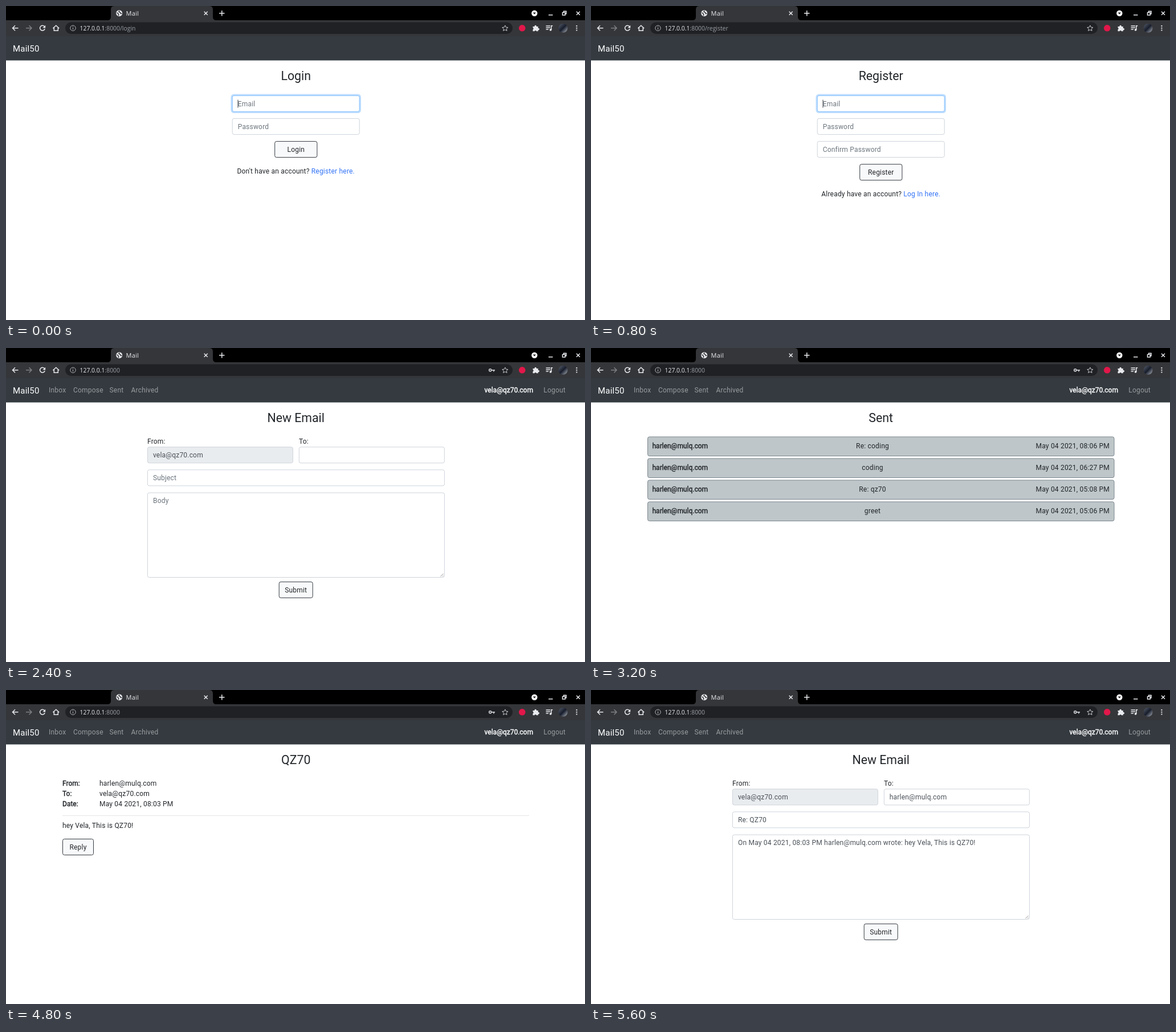
Recreate the animation shown at these times as an HTML page. Size 1016 by 551 pixels, loop 6.4 s.

```html
<!DOCTYPE html>
<html lang="en">
<head>
<meta charset="utf-8">
<title>Mail</title>
<style>
  html, body { margin: 0; width: 100%; height: 100%; overflow: hidden; background: #fff; }
  svg { display: block; width: 1016px; height: 551px; }
  text { font: 12px Roboto, sans-serif; letter-spacing: .2px; fill: #212529; white-space: pre; }
  .mid { text-anchor: middle; }
  .end { text-anchor: end; }
  text.head { font-size: 21.3px; letter-spacing: 0; }
  text.brand { font-size: 15px; fill: #fff; }
  text.nav { fill: #999c9f; }
  text.strong { letter-spacing: 0; stroke: #212529; stroke-width: .4px; }
  text.user { fill: #fff; stroke: #fff; }
  text.small { font-size: 10.4px; fill: #343a40; }
  text.hint { fill: #6c757d; }
  text.value { fill: #495057; }
  .link { fill: #3273f6; }
  text.tab { font: 11px "Open Sans", sans-serif; fill: #e8eaed; }
  text.url { font: 10.4px "Open Sans", sans-serif; letter-spacing: 0; fill: #9aa0a6; }
  .host { fill: #e8eaed; }
  .line { fill: none; stroke: #e8eaed; stroke-width: 1.5; }
  .solid { fill: #e8eaed; }
  .field { fill: #fff; stroke: #ced4da; }
  .field.locked { fill: #e9ecef; }
  .field.focus { stroke: #80bdff; }
  .row { fill: #bec6c9; stroke: #7b858c; }
  .button { fill: #f8f9fa; stroke: #343a40; }
  .button.clear { fill: none; }
  .screen { visibility: hidden; animation: show 6.4s step-end infinite; }
  .session { visibility: hidden; animation: session 6.4s step-end infinite; }
  @keyframes show { 0% { visibility: visible; } 12.5%, 100% { visibility: hidden; } }
  @keyframes session { 0% { visibility: hidden; } 25%, 100% { visibility: visible; } }
</style>
</head>
<body>
<svg viewBox="0 0 1016 551">
  <defs>
    <linearGradient id="photo" x2="1" y2="1">
      <stop offset="0" stop-color="#59616f"/>
      <stop offset=".5" stop-color="#181d2c"/>
      <stop offset="1" stop-color="#aeb4bd"/>
    </linearGradient>
  </defs>
  <rect width="1016" height="551" fill="#fff"/>
  <rect width="1016" height="26" fill="#000"/>
  <rect y="25" width="1016" height="28" fill="#353639"/>
  <path d="M178 25Q184 25 184 19V6Q184 0 190 0H357Q363 0 363 6V19Q363 25 369 25Z" fill="#353639"/>
  <rect x="104" y="28.5" width="785" height="20.5" rx="10.2" fill="#202125"/>
  <rect y="53" width="1016" height="42.5" fill="#343a40"/>

  <!-- tab strip -->
  <circle class="solid" cx="198.7" cy="12.7" r="5.5"/>
  <path d="M194.5 11.5l3 2.7v3M199 8.2l-1 2 2.5 1.2 1 2.2 2-.7" fill="none" stroke="#353639" stroke-width="1.5"/>
  <text class="tab" x="210.5" y="16.7">Mail</text>
  <path class="line" d="M347.7 9.8l6 6m0-6l-6 6M374 12.7h9.5M378.8 8v9.5"/>
  <circle cx="927.3" cy="12.7" r="5.2" fill="#fff"/>
  <path d="M924.8 11.5h5l-2.5 3z" fill="#000"/>
  <path class="line" d="M952 15.8h7.5M976.5 11.5h4.7v4.5h-4.7zM978.5 11V9.2h4.5v4.5h-1.5M1001 9.8l6 6m0-6l-6 6"/>

  <!-- toolbar -->
  <path class="line" d="M21.5 38.8H11.8M16 34.3l-4.5 4.5 4.5 4.5"/>
  <path class="line" d="M35 38.8h9.7M40.5 34.3l4.5 4.5-4.5 4.5" style="stroke:#7d7f82"/>
  <path class="line" d="M67.3 35.7a4.4 4.4 0 1 0 .9 4.3"/>
  <path class="solid" d="M69.2 33.7v4.8h-4.8z"/>
  <path class="line" d="M82.3 39.2l5.5-5 5.5 5M84.3 38v5.2h7V38"/>
  <g class="line" style="stroke:#b4b7bb;stroke-width:1">
    <circle cx="117.5" cy="38.8" r="4.7"/>
    <path d="M117.5 38v3.5M117.5 35.8v1.2"/>
  </g>
  <path d="M875.8 33.9l1.5 3.3 3.6.4-2.7 2.4.8 3.5-3.2-1.8-3.2 1.8.8-3.5-2.7-2.4 3.6-.4z" fill="none" stroke="#c4c7cb"/>
  <circle cx="905.7" cy="38.8" r="5.8" fill="#e2174a"/>
  <path class="solid" d="M924.5 36h3a1.7 1.7 0 1 1 3.2 0h3v3a1.7 1.7 0 1 1 0 3.2v2h-3a1.7 1.7 0 0 0-3.2 0h-3v-3a1.7 1.7 0 0 0 0-3.2z"/>
  <path class="line" d="M947.5 35h7.5M947.5 38h7.5M947.5 41h4.5M956.8 42v-7.3h2.5"/>
  <circle class="solid" cx="955.6" cy="41.8" r="1.9"/>
  <circle cx="977.5" cy="38.8" r="8" fill="url(#photo)"/>
  <path class="solid" d="M1000.4 34h2v2h-2zm0 3.8h2v2h-2zm0 3.8h2v2h-2z"/>
  <text class="url" x="129.5" y="42.5"><tspan class="host">127.0.0.1</tspan>:8000<tspan class="screen">/login</tspan></text>
  <text class="brand" x="12" y="79.5">Mail50</text>

  <g class="session">
    <circle cx="849.7" cy="38.8" r="2" fill="none" stroke="#c4c7cb" stroke-width="1.7"/>
    <path d="M852 38.8h6M855.8 39v2.4" fill="none" stroke="#c4c7cb" stroke-width="1.7"/>
    <text class="nav" x="75" y="78">Inbox</text>
    <text class="nav" x="118" y="78">Compose</text>
    <text class="nav" x="181.5" y="78">Sent</text>
    <text class="nav" x="219.5" y="78">Archived</text>
    <text class="strong user end" x="925" y="78">vela@qz70.com</text>
    <text class="nav end" x="982" y="78">Logout</text>
  </g>
  <g id="pages"></g>
</svg>
<script>
const SLOT = 800;
const me = "vela@qz70.com";
const peer = "harlen@mulq.com";

const text = (x, y, str, cls = "") => `<text class="${cls}" x="${x}" y="${y}">${str}</text>`;
const box = (x, y, w, h, cls) => `<rect class="${cls}" x="${x}" y="${y}" width="${w}" height="${h}" rx="3"/>`;
const heading = str => text(508.7, 129.7, str, "head mid");
const button = (x, y, w, str) => box(x, y, w, 28, "button") + text(x + w / 2, y + 18.2, str, "mid");
const field = (x, y, w, str, kind = "hint", state = "") =>
  box(x, y, w, 28, "field " + state) + text(x + 9.5, y + 18.3, str, kind);

// Sign-in and sign-up forms share one column
function account(title, hints, question, link) {
  const glow = `<rect x="396" y="156" width="225.5" height="30.5" rx="4" fill="none" stroke="#bfdeff" stroke-width="3"/>`;
  const fields = hints.map((hint, i) =>
    field(397.2, 157.3 + i * 40.1, 223, hint, "hint", i ? "" : "focus")).join("");
  const y = 157.4 + hints.length * 40.1;
  const caret = `<path d="M407 164.5v14" stroke="#343a40"/>`;
  return heading(title) + glow + fields + caret + button(471.7, y, 74.2, title) +
    text(508.7, y + 56, `${question} <tspan class="link">${link}</tspan>`, "mid");
}

// Each mail: subject, subject centre, date, date centre
function mailList(title, action, width, mails) {
  return heading(title) + mails.map(([subject, sx, date, dx], i) => {
    const y = 155.9 + i * 43.2, base = y + 23.3;
    return box(99.5, y, 818.5, 38.6, "row") + text(107.5, base, peer, "strong") +
      text(sx, base, subject, "mid") + text(dx, base, "May 04 2021, " + date, "mid") +
      box(910.2 - width, y + 8.2, width, 22.6, "button clear") +
      text(910.2 - width / 2, y + 22.8, action, "small mid");
  }).join("");
}

function sentList(mails) {
  return heading("Sent") + mails.map(([subject, date], i) => {
    const y = 155.9 + i * 38, base = y + 20.5;
    return box(99.5, y, 818.5, 33.6, "row") + text(107.5, base, peer, "strong") +
      text(494, base, subject, "mid") + text(910, base, "May 04 2021, " + date, "end");
  }).join("");
}

function compose(to, subject, body, kind) {
  return heading("New Email") + text(248, 168, "From:") + text(514, 168, "To:") +
    field(248.4, 173.8, 255, me, "value", "locked") + field(514.3, 173.8, 255, to, kind) +
    field(248.4, 213.8, 521, subject, kind) +
    box(248.4, 254.1, 521, 148.4, "field") + text(258, 271.8, body, kind) +
    `<path d="M762.5 401l5-5M766 401l1.5-1.5" stroke="#777" stroke-width=".8"/>` +
    button(479.2, 410.4, 59, "Submit");
}

function message() {
  const line = (y, label, str) => text(99, y, label, "strong") + text(164, y, str);
  return heading("QZ70") + line(168, "From:", peer) + line(186, "To:", me) +
    line(204, "Date:", "May 04 2021, 08:03 PM") +
    `<path d="M99 220.5H918" stroke="#e5e5e5"/>` +
    text(99, 242, "hey Vela, This is QZ70!") + button(99.5, 261.5, 54, "Reply");
}

const register = `<text class="url" x="129.5" y="42.5"><tspan visibility="hidden">127.0.0.1:8000</tspan>/register</text>`;

const pages = [
  account("Login", ["Email", "Password"], "Don't have an account?", "Register here."),
  register + account("Register", ["Email", "Password", "Confirm Password"], "Already have an account?", "Log In here."),
  mailList("Inbox", "Archive", 50.7, [
    ["QZ70", 374, "08:03 PM", 606.5],
    ["coding", 376.5, "07:21 PM", 610],
    ["Greet", 375.5, "07:18 PM", 607.5],
    ["greet", 375.5, "07:13 PM", 607.5],
    ["Re: coding", 380, "06:31 PM", 616.5],
    ["qz70", 374, "05:07 PM", 606],
    ["Re: greet", 378, "05:07 PM", 613.5]
  ]),
  compose("", "Subject", "Body", "hint"),
  sentList([["Re: coding", "08:06 PM"], ["coding", "06:27 PM"], ["Re: qz70", "05:08 PM"], ["greet", "05:06 PM"]]),
  mailList("Archive", "Unarchive", 62.4, [
    ["Re: coding", 375.7, "06:31 PM", 608],
    ["qz70", 370, "05:07 PM", 598]
  ]),
  message(),
  compose(peer, "Re: QZ70", `On May 04 2021, 08:03 PM ${peer} wrote: hey Vela, This is QZ70!`, "value")
];

document.getElementById("pages").innerHTML = pages.map((page, i) =>
  `<g class="screen" style="animation-delay:${i * SLOT}ms">${page}</g>`).join("");
</script>
</body>
</html>
```
